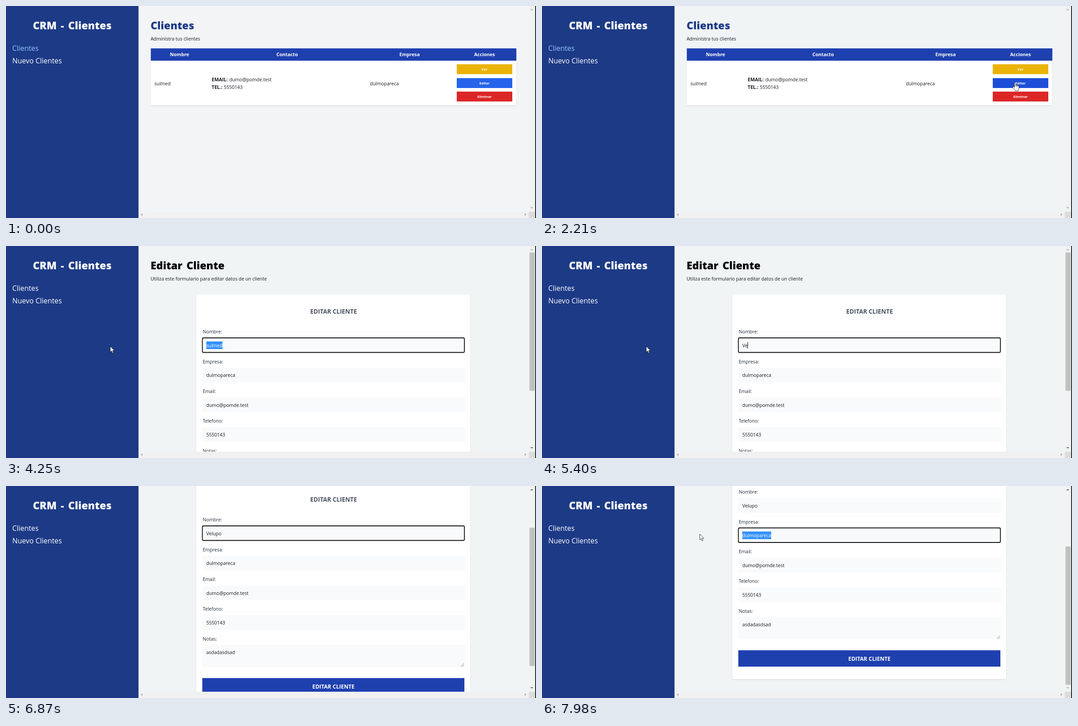
An HTML page with a canvas for the animation above (8000 ms loop, 1184 by 473 pixels).

```html
<!DOCTYPE html>
<html lang="es">
<head>
<meta charset="utf-8">
<title>CRM - Clientes</title>
<style>
  html, body { margin: 0; width: 100%; height: 100%; overflow: hidden; background: #f0f4f5; }
  canvas { display: block; width: 1184px; height: 473px; }
</style>
</head>
<body>
<canvas id="stage"></canvas>
<script>
const W = 1184, H = 473, LOOP = 8000;
const canvas = document.getElementById('stage');
const ctx = canvas.getContext('2d');
const dpr = window.devicePixelRatio || 1;
canvas.width = W * dpr;
canvas.height = H * dpr;

const FAMILY = '"Open Sans", "Noto Sans", sans-serif';
const BODY = '400 10.48px ' + FAMILY;
const STRONG = '700 10.6px ' + FAMILY;
const TITLE = '800 23.2px ' + FAMILY;
const LINK = '400 15.9px ' + FAMILY;
const SMALL = '700 7.7px ' + FAMILY;
const HEADING = '700 13.4px ' + FAMILY;
const SUBMIT = '700 12.1px ' + FAMILY;

const NAVY = '#1d3a86', BLUE = '#1e40af', INK = '#16191f';
const client = { name: 'sulmed', company: 'dulmopareca', email: 'dumo@pomde.test', phone: '5550143', notes: 'asdadasdsad' };
const NEW_NAME = 'Velupo';
const KEYS = [5320, 5400, 5550, 5620, 5790, 5960];

// Held values: each row starts at its time
const SCROLL = [[0, 0], [6790, 50], [6870, 116], [6940, 164], [7000, 178]];
const POINTER = [
  [0], [1150, 'arrow', 834, 381], [1650, 'arrow', 914, 215], [1900, 'arrow', 960, 200],
  [1980, 'hand', 1010, 180], [2050, 'hand', 1047, 172], [2210, 'hand', 1051, 170],
  [2530, 'hand', 1030, 170], [3610], [3930, 'beam', 485, 214], [4000, 'arrow', 332, 222],
  [4080, 'arrow', 234, 224], [4250, 'arrow', 232.5, 223.5], [6280], [6440, 'arrow', 269, 222],
  [6790], [7420, 'beam', 514, 102], [7570, 'beam', 452, 102], [7980, 'arrow', 352, 107]
];
const at = (track, t) => track.filter(row => row[0] <= t).pop();

function rect(x, y, w, h, color) {
  ctx.fillStyle = color;
  ctx.fillRect(x, y, w, h);
}

function text(str, x, y, font, color, align = 'left') {
  ctx.font = font;
  ctx.fillStyle = color;
  ctx.textAlign = align;
  ctx.fillText(str, x, y);
}

function title(str, x, color, align) {
  ctx.wordSpacing = '3px';
  text(str, x, 52, TITLE, color, align);
  ctx.wordSpacing = '0px';
}

function card(x, y, w, h, r) {
  ctx.save();
  ctx.shadowColor = 'rgba(0,0,0,.12)';
  ctx.shadowBlur = 2.5 * dpr;
  ctx.shadowOffsetY = dpr;
  ctx.fillStyle = '#fff';
  ctx.beginPath();
  ctx.roundRect(x, y, w, h, r);
  ctx.fill();
  ctx.restore();
}

function sidebar(t) {
  rect(0, 0, 296, H, NAVY);
  title('CRM - Clientes', 148, '#fff', 'center');
  text('Clientes', 14, 100, LINK, t < 2960 ? '#93c5fd' : '#fff');
  text('Nuevo Clientes', 14, 128, LINK, '#fff');
}

function table(t) {
  title('Clientes', 323, NAVY);
  text('Administra tus clientes', 323, 77, BODY, INK);
  card(323.5, 94.5, 816.5, 127, 0);
  rect(323.5, 94.5, 816.5, 27.5, BLUE);
  [['Nombre', 387.5], ['Contacto', 628], ['Empresa', 901.5], ['Acciones', 1069]]
    .forEach(([label, x]) => text(label, x, 112, STRONG, '#fff', 'center'));

  text(client.name, 331.5, 176.5, BODY, INK);
  text('EMAIL:', 459.5, 167.5, STRONG, INK);
  text(client.email, 499, 167.5, BODY, INK);
  text('TEL.:', 459.5, 184.5, STRONG, INK);
  text(client.phone, 486.5, 184.5, BODY, INK);
  text(client.company, 813, 176.5, BODY, INK);

  const edit = t >= 1980 ? '#1d4ed8' : '#2563eb';
  [['Ver', '#eab308', 130], ['Editar', edit, 161], ['Eliminar', '#dc2626', 191]]
    .forEach(([label, color, y]) => {
      rect(1007, y, 124, 22, color);
      text(label, 1069, y + 13.7, SMALL, '#fff', 'center');
    });
}

function field(label, value, y, { h = 33, focus, caret, from = -1 } = {}) {
  text(label, 439.5, y - 10, BODY, '#1f2937');
  rect(438.5, y, 587, h, '#f9fafb');
  if (focus) {
    ctx.strokeStyle = '#101010';
    ctx.lineWidth = 1.8;
    ctx.beginPath();
    ctx.roundRect(438.7, y, 585.3, 32.5, 2.5);
    ctx.stroke();
  }
  const base = y + 20.7;
  text(value, 447.5, base, BODY, INK);
  const end = ctx.measureText(value).width;
  if (from >= 0) {
    const x = 447.5 + ctx.measureText(value.slice(0, from)).width;
    rect(x, y + 8, 447.5 + end - x, 17, '#3390ff');
    text(value.slice(from), x, base, BODY, '#fff');
  }
  if (caret) rect(Math.round(447.5 + end), y + 9, 1, 15, '#111');
}

function form(t, scroll) {
  ctx.save();
  ctx.beginPath();
  ctx.rect(296, 0, 872, 459);
  ctx.clip();
  ctx.translate(0, -scroll);
  title('Editar Cliente', 323, '#000');
  text('Utiliza este formulario para editar datos de un cliente', 323, 77, BODY, INK);

  if (t < 3110) {
    text('cliente ID no valido', 323, 93.5, BODY, INK);
  } else {
    card(425, 108, 612, 501, 3);
    text('EDITAR CLIENTE', 731.8, 150.5, HEADING, '#4b5563', 'center');

    const typed = KEYS.filter(k => k <= t).length;
    const onName = t >= 3930 && t < 7420, onCompany = t >= 7420;
    field('Nombre:', typed ? NEW_NAME.slice(0, typed) : client.name, 205, {
      focus: onName, caret: typed && t < 6440, from: t >= 4000 && !typed ? 0 : -1
    });
    field('Empresa:', client.company, 271.5, {
      focus: onCompany, from: t >= 7980 ? 0 : t >= 7570 ? 1 : -1
    });
    field('Email:', client.email, 338);
    field('Telefono:', client.phone, 404.3);
    field('Notas:', client.notes, 470.5, { h: 49.5 });

    ctx.strokeStyle = '#777';
    ctx.lineWidth = 0.9;
    ctx.beginPath();
    for (const d of [7, 3]) {
      ctx.moveTo(1023 - d, 519);
      ctx.lineTo(1023, 519 - d);
    }
    ctx.stroke();

    rect(438.5, 544.5, 585.5, 36.5, BLUE);
    text('EDITAR CLIENTE', 731.5, 567.8, SUBMIT, '#fff', 'center');
  }
  ctx.restore();
}

function triangle(x, y, turn, color) {
  ctx.save();
  ctx.translate(x, y);
  ctx.rotate(turn * Math.PI / 2);
  ctx.fillStyle = color;
  ctx.beginPath();
  ctx.moveTo(-3, 1.6);
  ctx.lineTo(0, -1.6);
  ctx.lineTo(3, 1.6);
  ctx.fill();
  ctx.restore();
}

function scrollbars(t, scroll) {
  const off = '#a3a3a3', on = '#505050', long = t >= 3110;
  rect(1168, 0, 14, 459, '#f1f2f3');
  rect(296, 459, 872, 14, '#f1f1f1');
  rect(1168, 459, 14, 14, '#dcdcdc');
  if (long) rect(1169.5, 14.5 + scroll * 0.677, 11.5, 308.5, '#c1c1c1');
  triangle(1174.5, 8, 0, long && scroll > 0 ? on : off);
  triangle(1174.5, 450.5, 2, long && scroll < 178 ? on : off);
  triangle(303, 465.5, 3, off);
  triangle(1160.5, 465.5, 1, off);
  rect(1182.3, 0, 1.7, H, '#0c0c0c');
}

const ARROW = new Path2D('M.5 .5V13.2L3.4 10.5L5.5 15.4L7.6 14.5L5.5 9.8H9.6Z');
const HAND = new Path2D('M4.5 11.5V2C4.5 .1 7.3 .1 7.3 2V7C7.5 5.7 9.7 5.8 9.8 7.3' +
  'C10.2 6.2 12.1 6.5 12.2 8C12.7 7 14.4 7.4 14.4 9V13.5C14.4 16 12.8 16.8 12.6 19.2H6.2' +
  'C5.8 16.8 2.8 14.6 1 11.8C0 10 2 9 3 10Z');
const FINGERS = new Path2D('M7.3 6.5V10M9.8 7.3V10M12.2 8V10.4');

function pointer([, kind, x, y]) {
  if (!kind) return;
  ctx.save();
  ctx.translate(x, y);
  ctx.lineWidth = 0.9;
  ctx.lineJoin = 'round';
  ctx.fillStyle = '#fff';
  ctx.strokeStyle = '#222';
  if (kind === 'beam') {
    rect(-0.5, 0, 1, 16, '#222');
    rect(-3, 0, 6, 1, '#222');
    rect(-3, 15, 6, 1, '#222');
  } else {
    const shape = kind === 'hand' ? HAND : ARROW;
    ctx.fill(shape);
    ctx.stroke(shape);
    if (kind === 'hand') ctx.stroke(FINGERS);
  }
  ctx.restore();
}

function draw(t) {
  const scroll = at(SCROLL, t)[1];
  ctx.setTransform(dpr, 0, 0, dpr, 0, 0);
  rect(0, 0, W, H, t < 90 ? '#f3f4f6' : '#f0f4f5');
  if (t < 2960) table(t);
  else form(t, scroll);
  sidebar(t);
  scrollbars(t, scroll);
  pointer(at(POINTER, t));
}

function tick() {
  draw(performance.now() % LOOP);
  requestAnimationFrame(tick);
}
tick();
</script>
</body>
</html>
```
